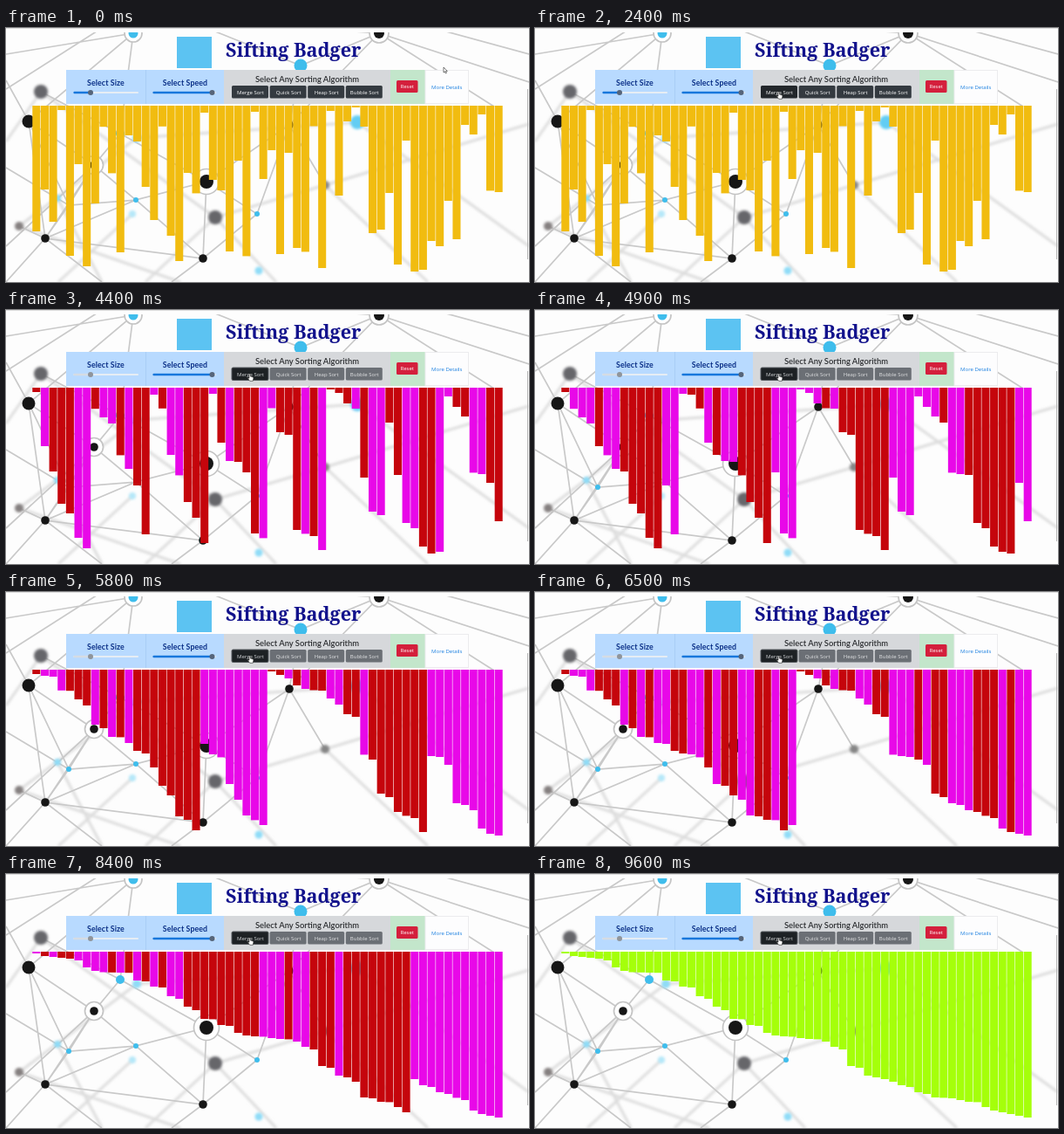
These frames come from a looping animation (600 px wide and 291 px high, 10000 ms). An HTML page:

```html
<!DOCTYPE html>
<html lang="en">
<head>
<meta charset="utf-8">
<title>Sorting visualizer</title>
<style>
  html, body { margin: 0; width: 100%; height: 100%; overflow: hidden; background: #fdfdfd; }
  svg { display: block; width: 600px; height: 291px; }
  text { text-anchor: middle; }
  .title { font: bold 21.7px "Noto Serif", serif; fill: #12128c; }
  .label { font: bold 8.8px Lato, sans-serif; fill: #0a2f86; letter-spacing: .1px; }
  .heading { font: 600 9.4px Lato, sans-serif; fill: #2b2d30; }
  .small { font: 6px "Open Sans", sans-serif; fill: #fff; }
  .small.link { fill: #1a7fe0; }
  .btn rect { fill: #343a40; }
  .busy .btn rect { fill: #6b6f75; }
  .busy .btn text { fill: #e4e5e6; }
  .hover .btn:first-child rect { fill: #23272b; }
  .busy .btn:first-child rect { fill: #1d2124; stroke: #55595e; }
  .busy .btn:first-child text { fill: #d4d6d8; }
  .track { stroke: #e6edf4; stroke-width: 2.2; stroke-linecap: round; }
  .fill { stroke: #1877dc; stroke-width: 2.4; stroke-linecap: round; }
  .knob { fill: #56657a; }
  .busy .size .fill { stroke: #d5dce3; }
  .busy .size .knob { fill: #8f959c; }
</style>
</head>
<body>
<svg id="stage" viewBox="0 0 600 291" xmlns="http://www.w3.org/2000/svg">
  <defs>
    <filter id="soft" x="-60%" y="-60%" width="220%" height="220%"><feGaussianBlur stdDeviation="1.6"/></filter>
  </defs>
  <rect width="600" height="291" fill="#fdfdfd"/>
  <g id="net"></g>
  <rect width="600" height="5" fill="#fdfdfd"/>
  <path d="M0 .5H600" stroke="#dedede"/>
  <path d="M598.5 70V265" stroke="#b5b5b5"/>

  <rect x="196" y="10" width="40" height="36" fill="#5cc3f2"/>
  <text class="title" x="329.8" y="32.5">Sifting Badger</text>

  <rect x="69" y="48" width="181" height="39" fill="#b8daff"/>
  <path d="M160.5 48V87" stroke="#a9cdf5"/>
  <rect x="250" y="48" width="191" height="39" fill="#d6d8db"/>
  <rect x="441" y="48" width="40" height="39" fill="#c3e6cb"/>
  <rect x="481" y="48.5" width="49.5" height="38" fill="#fdfdfe" stroke="#ececee"/>

  <text class="label" x="114.5" y="65.5">Select Size</text>
  <text class="label" x="205.5" y="65.5">Select Speed</text>
  <g class="size">
    <path class="track" d="M78.5 74H151"/><path class="fill" d="M78.5 74H97"/>
    <circle class="knob" cx="97" cy="74" r="3"/>
  </g>
  <g>
    <path class="track" d="M169.5 74H240"/><path class="fill" d="M169.5 74H236"/>
    <circle class="knob" cx="236.5" cy="74" r="3"/>
  </g>

  <text class="heading" x="345.5" y="61.5">Select Any Sorting Algorithm</text>
  <g id="buttons"></g>
  <rect x="448" y="60" width="24.5" height="14" rx="1.5" fill="#d41f3c"/>
  <text class="small" x="460.2" y="69.3">Reset</text>
  <text class="small link" x="505.8" y="70.4">More Details</text>

  <g id="bars"></g>
  <path id="arrow" d="M0 0V6L1.4 4.8L2.4 7L3.4 6.5L2.5 4.4H4.3Z" fill="#fff" stroke="#222" stroke-width=".6"/>
  <path id="hand" d="M279 73.5q.8-.9 1.5 0v2.6l2.6.7q1 .4.8 1.5l-.6 3h-3.6l-2.4-3q.4-1 1.7 0Z" fill="#fff" stroke="#222" stroke-width=".6"/>
</svg>
<script>
const LOOP = 10000, TICK = 100, STEP = 47;
const SORT_AT = 3682, DONE_AT = 9600, HOVER_AT = 800;
const TOP = 89, LEFT = 30, PITCH = 540 / 56, GAP = .6;
const GOLD = '#f1bc10', RED = '#c5050c', PINK = '#e808e8', GREEN = '#a5ff0a';

// Lower edge of each bar.
const ends = [
  233, 185, 222, 94, 261, 156, 273, 201, 113.2, 166.4, 257, 123, 130, 182,
  220, 112.8, 238, 267, 166, 189.4, 97, 174, 186, 256, 152, 261.4, 96, 173,
  140, 259, 143, 252, 256.4, 112.5, 275, 95, 192, 107, 91, 113, 235, 231,
  189, 271, 129, 279, 277, 244, 250, 198, 242, 111, 122, 99, 186.4, 188
];

const $ = id => document.getElementById(id);
function add(parent, tag, attrs, text) {
  const el = document.createElementNS('http://www.w3.org/2000/svg', tag);
  for (const key in attrs) el.setAttribute(key, attrs[key]);
  if (text) el.textContent = text;
  return parent.appendChild(el);
}

function drawNet() {
  const net = $('net');
  const line = (d, width, color, soft) => add(net, 'path', {
    d, fill: 'none', stroke: color, 'stroke-width': width, ...(soft && { filter: 'url(#soft)' })
  });
  line('M40 73L240 217L310 291M15 227L150 126L403 108M366 180L484 291M366 180L600 110M403 108L600 250' +
    'M366 180L240 217M59 195L110 291M145 213L60 291M15 227L200 291M40 73L0 130M240 217L160 291',
    3, '#dcdcdc', true);
  line('M0 60L26 107L146 6L131 121L101 157L26 107L72 203L149 197L101 157L45 241L226 264L149 197L230 176' +
    'L131 121L40 73M26 107L45 241L149 197M0 250L101 157L72 203L0 160M0 291L45 241L110 291M15 227L45 241L72 203' +
    'M230 176L226 264L190 291M226 264L288 213L230 176L325 111L288 213M0 70L110 0M146 6L0 30' +
    'M230 0L338 43L325 111L428 6L600 62M325 111L366 180M338 43L428 6L560 90M428 6L340 0M490 0L600 30',
    1.7, '#c9c9c9');

  const dot = (x, y, r, fill, soft, ring) => {
    if (ring) add(net, 'circle', { cx: x, cy: y, r: ring, fill: '#fff', stroke: '#c4c4c4', 'stroke-width': 1.7 });
    add(net, 'circle', { cx: x, cy: y, r, fill, ...(soft && { filter: 'url(#soft)' }) });
  };
  const ink = '#161616', sky = '#3fbdec', pale = '#8fdcf7', haze = '#66666a';
  dot(40, 73, 8, haze, true);
  dot(240, 217, 8, haze, true);
  dot(15, 227, 5, '#858080', true);
  dot(366, 180, 5, '#858585', true);
  dot(403, 108, 8, '#62cdf3', true);
  dot(150, 126, 5, pale, true);
  dot(145, 213, 4, '#b5e8f9', true);
  dot(59, 195, 4, pale, true);
  dot(290, 278, 4.5, pale, true);
  dot(146, 6, 5.5, sky, false, 10);
  dot(338, 43, 7.5, sky);
  dot(131, 121, 5, sky);
  dot(72, 203, 3, sky);
  dot(149, 197, 3, sky);
  dot(288, 213, 3, sky);
  dot(428, 6, 6, ink, false, 11);
  dot(26, 107, 7.5, ink);
  dot(45, 241, 4.8, ink);
  dot(226, 264, 4.8, ink);
  dot(325, 111, 4.8, ink);
  dot(101, 157, 4.8, ink, false, 10.5);
  dot(230, 176, 8, ink, false, 14.5);
}

function drawButtons() {
  ['Merge', 'Quick', 'Heap', 'Bubble'].forEach((name, i) => {
    const x = 259 + i * 43.6, g = add($('buttons'), 'g', { class: 'btn' });
    add(g, 'rect', { x, y: 66, width: 42, height: 14.5, rx: 1.5 });
    add(g, 'text', { x: x + 21.5, y: 75.6, class: 'small' }, name + ' Sort');
  });
}

// Ranges of the merge tree, grouped by depth.
const levels = [];
function split(l, r, depth = 0) {
  const mid = (l + r) >> 1;
  (levels[depth] ||= []).push([l, mid, r]);
  if (l < r) {
    split(l, mid, depth + 1);
    split(mid + 1, r, depth + 1);
  }
}

// In-place merge stopped after a number of steps.
function merge(bars, [l, mid, r], steps) {
  for (let i = l; i <= r; i++) bars[i] = { end: bars[i].end, color: i <= mid ? RED : PINK };
  let a = l, b = mid + 1;
  for (; steps > 0 && a < b && b <= r; steps--, a++) {
    if (bars[a].end > bars[b].end) bars.splice(a, 0, ...bars.splice(b++, 1));
  }
}

function barsAt(time) {
  const bars = ends.map(end => ({ end, color: GOLD }));
  let start = SORT_AT;
  for (const level of levels) {
    if (time < start) break;
    const steps = Math.floor((time - start) / STEP);
    level.forEach(range => merge(bars, range, steps));
    start += STEP * (1 + Math.max(...level.map(([l, , r]) => r - l + 1)));
  }
  if (time >= DONE_AT) bars.forEach(bar => bar.color = GREEN);
  return bars;
}

drawNet();
drawButtons();
split(0, ends.length - 1);
levels.reverse();
const rects = ends.map((_, i) => add($('bars'), 'rect', {
  x: LEFT + i * PITCH + GAP / 2, y: TOP, width: PITCH - GAP
}));
const path = [[0, 502, 45], [500, 450, 55], [600, 388, 68]];
let shown = -1;

function render(time) {
  barsAt(time).forEach(({ end, color }, i) => {
    rects[i].setAttribute('height', end - TOP);
    rects[i].setAttribute('fill', color);
  });
  const hover = time >= HOVER_AT;
  const [, x, y] = path.filter(p => p[0] <= time).pop();
  $('stage').setAttribute('class', (hover ? 'hover' : '') + (time >= SORT_AT ? ' busy' : ''));
  $('arrow').setAttribute('transform', `translate(${x} ${y})`);
  $('arrow').setAttribute('visibility', hover ? 'hidden' : 'visible');
  $('hand').setAttribute('visibility', hover ? 'visible' : 'hidden');
}

const origin = performance.now();
function tick() {
  const time = Math.floor((performance.now() - origin) % LOOP / TICK) * TICK;
  if (time !== shown) render(shown = time);
  requestAnimationFrame(tick);
}
tick();
</script>
</body>
</html>
```
